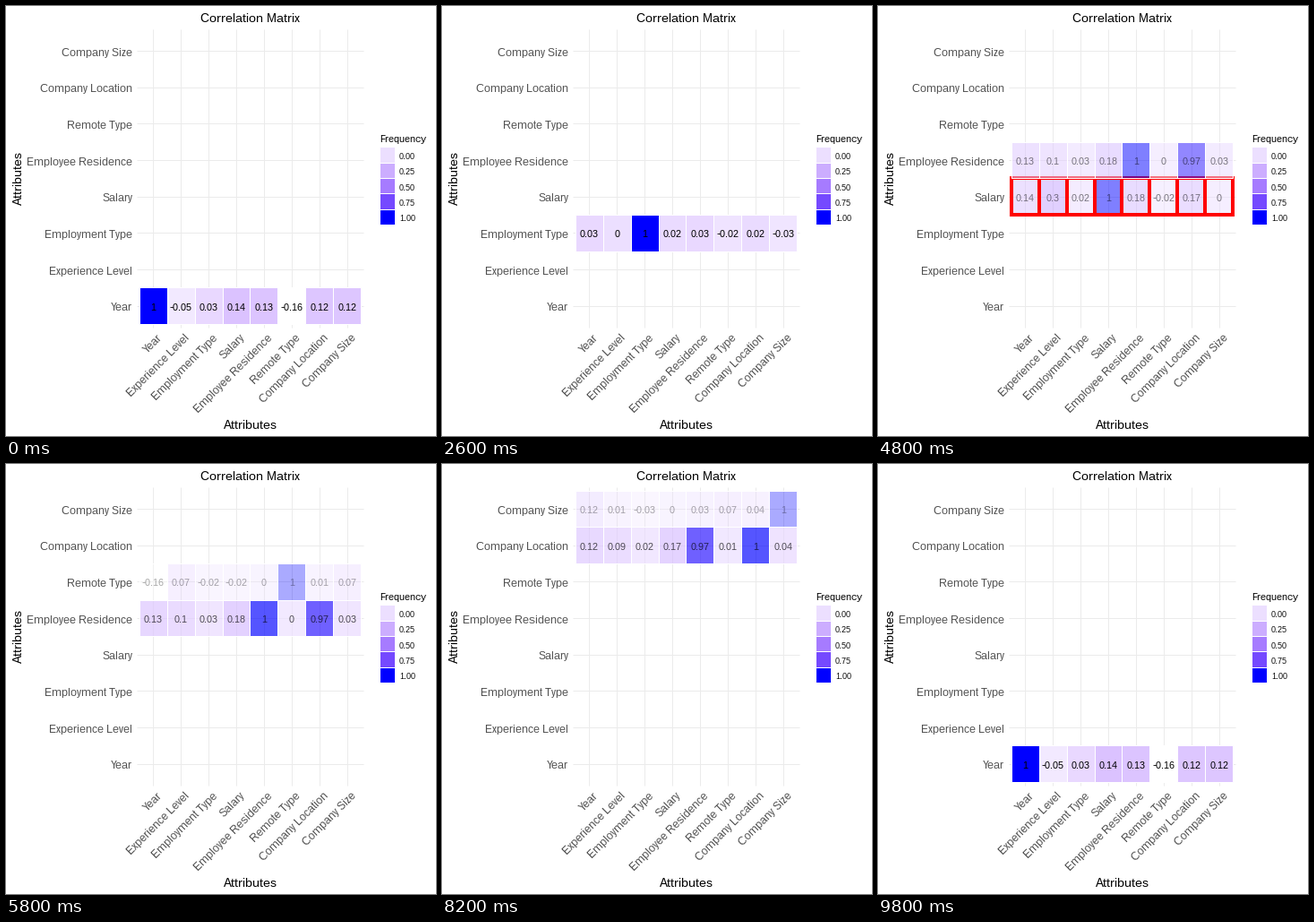
Animation, 480 px wide and 480 px high, one loop 10000 ms. Source, as a matplotlib script:

```python
import numpy as np
import matplotlib.pyplot as plt
from matplotlib.animation import FuncAnimation
from matplotlib.patches import Rectangle

# Full hinting gives crisp screen text on whole pixels
plt.rcParams.update({"font.family": "Liberation Sans",
                     "text.hinting": "native", "text.hinting_factor": 1})

SIZE, DPI = 480, 100
PX = 72 / DPI                       # points per pixel
LEFT, RIGHT, TOP, BOTTOM = 145.55, 399.4, 25.6, 359.1
CELL_W = (RIGHT - LEFT) / 8.2
CELL_H = (BOTTOM - TOP) / 8.2

NAMES = ["Year", "Experience Level", "Employment Type", "Salary",
         "Employee Residence", "Remote Type", "Company Location",
         "Company Size"]
N = len(NAMES)
SALARY, RESIDENCE, LOCATION = 3, 4, 6

FRAMES, INTERVAL = 50, 200
HOLD = 3                            # frames at rest after each fade
FADE_STEPS = [4] * 3 + [2] + [3] * 4


def correlations():
    lower = {1: [-5], 2: [3, 0], SALARY: [14, 30, 2],
             RESIDENCE: [13, 10, 3, 18], 5: [-16, 7, -2, -2, 0],
             7: [12, 1, -3, 0, 3, 7]}
    m = np.zeros((N, N), int)
    for r, values in lower.items():
        m[r, :len(values)] = values
    m += m.T
    # Location follows residence, one percent apart
    twin = m[RESIDENCE] + np.where(np.arange(N) < RESIDENCE, -1, 1)
    twin[RESIDENCE] = 97
    m[LOCATION] = m[:, LOCATION] = twin
    np.fill_diagonal(m, 100)
    return m / 100


CORR = correlations()

TO_XYZ = np.array([[.4124, .3576, .1805],
                   [.2126, .7152, .0722],
                   [.0193, .1192, .9505]])
WHITE = TO_XYZ.sum(axis=1)


def linear_to_lab(rgb):
    t = TO_XYZ @ rgb / WHITE
    x, y, z = np.where(t > .008856, np.cbrt(t), 7.787 * t + 16 / 116)
    return np.array([116 * y - 16, 500 * (x - y), 200 * (y - z)])


def lab_to_srgb(lab):
    fy = (lab[0] + 16) / 116
    f = np.array([fy + lab[1] / 500, fy, fy - lab[2] / 200])
    t = np.where(f > .2069, f ** 3, (f - 16 / 116) / 7.787)
    rgb = np.clip(np.linalg.solve(TO_XYZ, t * WHITE), 0, 1)
    return np.where(rgb > .0031308, 1.055 * rgb ** (1 / 2.4) - .055, 12.92 * rgb)


LAB_LOW = linear_to_lab(np.ones(3))
LAB_HIGH = linear_to_lab(np.array([0, 0, 1]))


def fill_color(value):
    """White to blue, blended in Lab over the data range."""
    t = (value - CORR.min()) / (1 - CORR.min())
    return tuple(np.clip(lab_to_srgb(LAB_LOW + t * (LAB_HIGH - LAB_LOW)), 0, 1))


def col_x(i):
    return LEFT + (i + .6) * CELL_W


def row_y(i):
    return BOTTOM - (i + .6) * CELL_H


fig = plt.figure(figsize=(SIZE / DPI, SIZE / DPI), dpi=DPI, facecolor="white")
ax = fig.add_axes([0, 0, 1, 1])
ax.set_xlim(0, SIZE)
ax.set_ylim(SIZE, 0)
ax.axis("off")


def label(x, y, text, size, color="black", ha="center", **kw):
    return ax.text(x, y, text, fontsize=size * PX, color=color, ha=ha,
                   va="baseline", rotation_mode="anchor", **kw)


def box(x, y, w, h, color, edge="white", lw=1, **kw):
    return ax.add_patch(Rectangle((x, y), w, h, facecolor=color, edgecolor=edge,
                                  linewidth=lw * PX, joinstyle="miter",
                                  snap=True, **kw))


def draw_axes():
    grid = dict(color="#EBEBEB", lw=PX, zorder=1, solid_capstyle="butt")
    for i, name in enumerate(NAMES):
        x, y = col_x(i), row_y(i)
        ax.plot([x, x], [TOP, BOTTOM], **grid)
        ax.plot([LEFT, RIGHT], [y, y], **grid)
        label(141, y + 5.5, name, 12, "#4D4D4D", "right")
        label(x + 10.5, 371, name, 12, "#4D4D4D", "right", rotation=45)
    label(272.7, 18, "Correlation Matrix", 14)
    label(272.5, 472, "Attributes", 14)
    label(18, 192.5, "Attributes", 14, rotation=90)


def draw_legend():
    key = 17.28
    label(417, 152, "Frequency", 11, ha="left")
    for i in range(5):
        y = 157.4 + key * i
        box(416.6, y, key, key, fill_color(i / 4))
        label(439, y + 13.6, f"{i / 4:.2f}", 9, ha="left")


def make_row(r):
    edge, lw = ("red", 4) if r == SALARY else ("white", 1)
    cells = []
    for c in range(N):
        color = fill_color(CORR[r, c])
        x, y = col_x(c), row_y(r)
        rect = box(x - CELL_W / 2, y - CELL_H / 2, CELL_W, CELL_H, color,
                   edge, lw, zorder=2)
        text = label(x, y + 5, f"{CORR[r, c]:g}", 11, zorder=3)
        cells.append((rect, text, color))
    return cells


def row_alphas(frame):
    """Crossfade from each row to the next, wrapping at the top."""
    start = HOLD
    for k, steps in enumerate(FADE_STEPS):
        t = np.clip((frame - start + 1) / steps, 0, 1)
        if t < 1:
            break
        start += steps + HOLD
    alphas = np.zeros(N)
    alphas[k] = 1 - t
    alphas[(k + 1) % N] = t
    return alphas


def update(frame):
    # Fills and numbers fade; the borders stay solid
    for cells, alpha in zip(rows, row_alphas(frame)):
        for rect, text, color in cells:
            rect.set_visible(alpha > 0)
            text.set_visible(alpha > 0)
            rect.set_facecolor((*color, alpha))
            text.set_alpha(alpha)
    return []


draw_axes()
draw_legend()
rows = [make_row(r) for r in range(N)]
anim = FuncAnimation(fig, update, frames=FRAMES, interval=INTERVAL,
                     init_func=lambda: update(0), repeat=True, repeat_delay=0)
plt.show()
```
